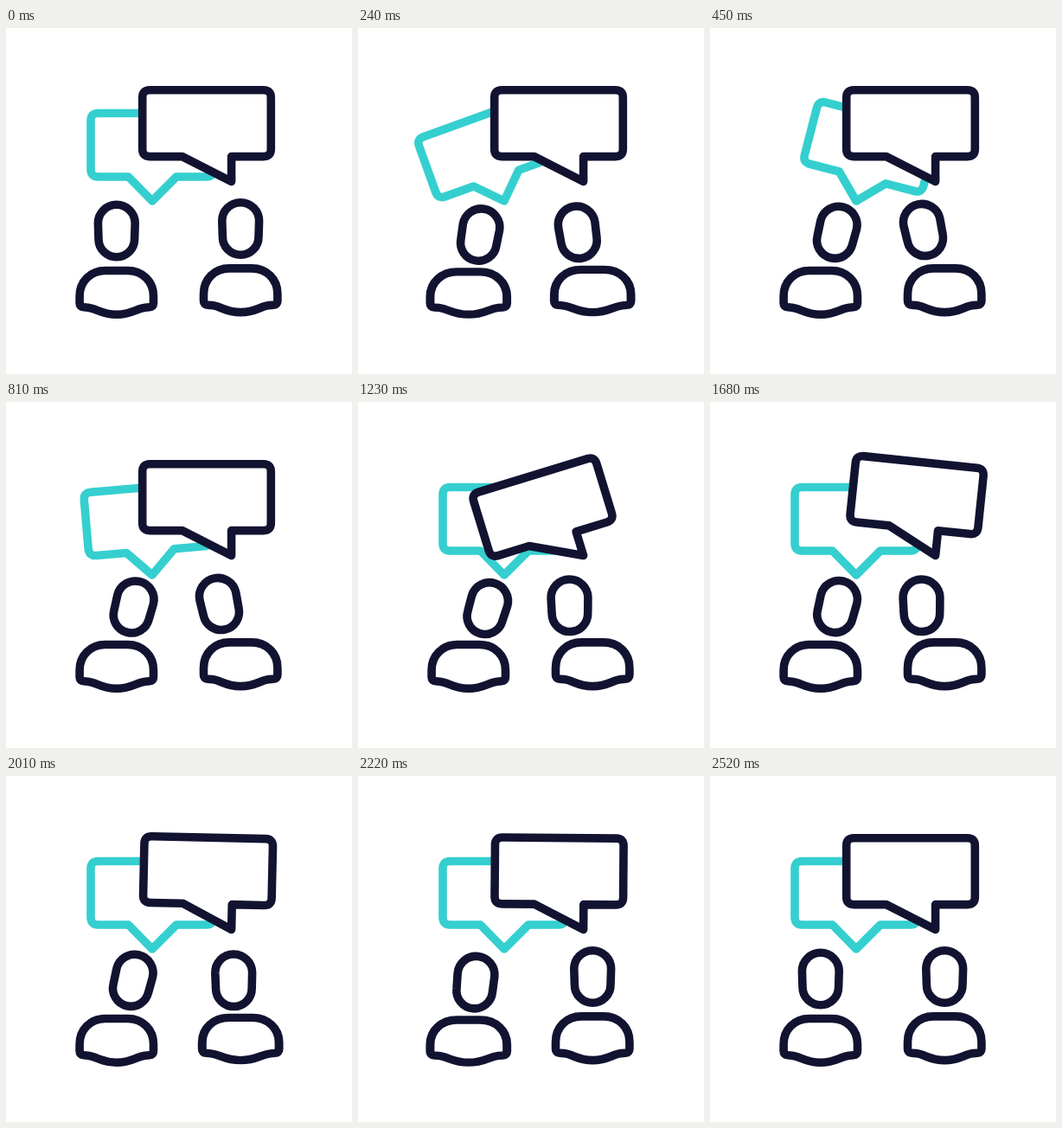
Recreate the animation shown at these times as an HTML page. Size 400 px wide and 400 px high, loop 4.55 s.

```html
<!DOCTYPE html>
<html lang="en">
<head>
<meta charset="utf-8">
<title>Conversation</title>
<style>
  html, body { margin: 0; width: 100%; height: 100%; overflow: hidden; background: #fff; }
  svg { display: block; width: 100%; height: 100%; }
  path { fill: none; stroke: #121331; stroke-width: 9.6; stroke-linecap: round; stroke-linejoin: round; }
  #back { stroke: #35cfcf; }
  #front { fill: #fff; }
</style>
</head>
<body>
<svg viewBox="0 0 400 400">
  <defs>
    <path id="headShape" d="M-21.4 -8.7 A21.4 21.4 0 0 1 21.4 -8.7 L20.8 9.6 A20.8 20.8 0 0 1 -20.8 9.6 Z"/>
    <path id="bodyShape" d="M-42.7 310 C-42.7 293 -30 280.5 -13 280.5 H13 C30 280.5 42.7 293 42.7 310
      V318 Q42.7 322.6 38 322.8 L33 323.2 C22 324.4 18 331.2 0 331.2
      C-18 331.2 -22 324.4 -33 323.2 L-38 322.8 Q-42.7 322.6 -42.7 318 Z"/>
  </defs>
  <path id="back"/>
  <path id="front"/>
  <use id="bodyL" href="#bodyShape"/>
  <use id="bodyR" href="#bodyShape"/>
  <use id="headL" href="#headShape"/>
  <use id="headR" href="#headShape"/>
</svg>
<script>
  const LOOP = 4550, STEP = 30, FRONT_DELAY = 1080;
  const el = id => document.getElementById(id);
  const place = (id, transform) => el(id).setAttribute('transform', transform);

  // Rounded box with a pointed tail hanging from its lower edge.
  function bubble(x0, y0, x1, y1, tail, r = 8.5) {
    return `M${x0 + r} ${y0} H${x1 - r} q${r} 0 ${r} ${r} V${y1 - r} q0 ${r} ${-r} ${r}
      L${tail} H${x0 + r} q${-r} 0 ${-r} ${-r} V${y0 + r} q0 ${-r} ${r} ${-r} Z`;
  }
  el('back').setAttribute('d', bubble(98, 98.5, 240, 172, '197 172 169 200 141.5 172'));
  el('front').setAttribute('d', bubble(157.7, 71.8, 306.3, 148.6, '260.6 148.6 260.6 177.5 203.8 148.6'));

  const clamp = v => Math.min(1, Math.max(0, v));
  const ease = p => (1 - Math.cos(Math.PI * clamp(p))) / 2;
  const ramp = (t, from, to) => ease((t - from) / (to - from));
  const pulse = (t, from, length) => Math.sin(Math.PI * clamp((t - from) / length)) ** 2;
  const hold = (t, from, to, rise) => ramp(t, from, from + rise) - ramp(t, to, to + rise);

  // Fading swing of a bubble about its tail tip: [time, degrees].
  const beats = [[0, 0], [210, -21], [470, 15], [520, 15], [705, -8], [990, 2.4], [1200, 0]];

  function swing(t) {
    let angle = 0;
    for (let i = 1; i < beats.length; i++) {
      const [t0, a] = beats[i - 1], [t1, b] = beats[i];
      angle += (b - a) * ramp(t, t0, t1);
    }
    return angle;
  }

  // Head offsets [x, y, degrees]: "lean" while in the talk, "extra" for the reaction.
  const people = {
    L: {
      cx: 127.8, lift: 0, back: 2010,
      lean: [18.8, 1.8, 13.7], extra: [3, 2.3, 2.8],
      react: t => pulse(t, 600, 1200)
    },
    R: {
      cx: 271.2, lift: -2.6, back: 1770,
      lean: [-24.5, 1.5, -12], extra: [-2, 1.8, 10.7],
      react: t => hold(t, 810, 1770, 375)
    }
  };

  function drawPerson(side, t) {
    const p = people[side];
    const lean = hold(t, 0, p.back, 380);
    const react = p.react(t);
    const dip = pulse(t, 0, 420) + pulse(t, p.back + 20, 420);
    const [x, y, r] = p.lean.map((v, i) => v * lean + p.extra[i] * react);
    place('head' + side, `translate(${p.cx + x} ${234.4 + p.lift + y + 3.4 * dip}) rotate(${r})`);
    place('body' + side,
      `translate(${p.cx} ${331 + p.lift}) scale(${1 + 0.04 * dip} ${1 - 0.03 * dip}) translate(0 -331)`);
  }

  function draw(t) {
    place('back', `rotate(${swing(t)} 169 200)`);
    place('front', `rotate(${swing(t - FRONT_DELAY)} 260.6 177.5)`);
    drawPerson('L', t);
    drawPerson('R', t);
  }

  const begin = performance.now();
  function tick() {
    const t = (performance.now() - begin) % LOOP;
    draw(Math.floor(t / STEP) * STEP);
    requestAnimationFrame(tick);
  }
  draw(0);
  requestAnimationFrame(tick);
</script>
</body>
</html>
```
